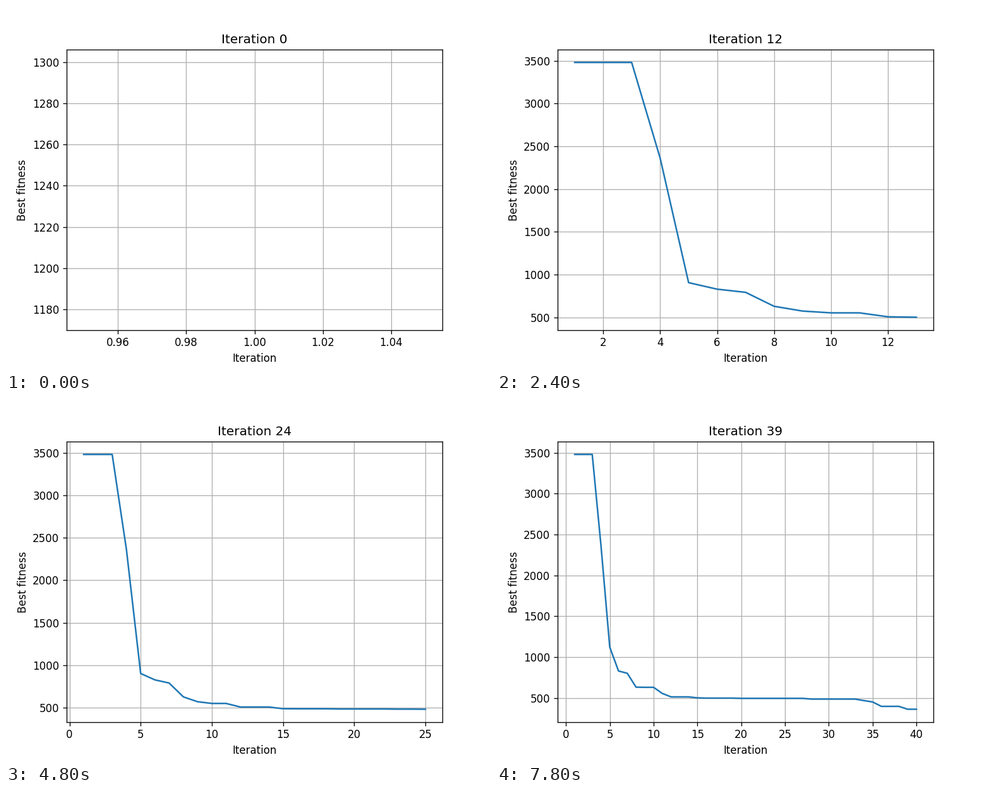
A matplotlib script for the animation above (8000 ms loop, 768 by 576 pixels).

```python
import matplotlib.pyplot as plt
from matplotlib.animation import FuncAnimation

FRAMES = 40
HEAD = [3480] * 3 + [2362]

# Fitness history of whichever candidate leads, keyed by the iteration count
# at which it takes the lead.
LATE = (HEAD + [1121, 829, 801, 631, 629, 629, 554] + [512] * 3 + [500]
        + [497] * 4)
HISTORIES = {
    1: [1238] * 4,
    5: HEAD[:3] + [2370, 833, 833, 633, 633, 557],
    10: HEAD + [906, 830, 793, 630, 574, 553, 553, 507, 502] + [490] * 5,
    19: (HEAD + [904, 829, 792, 629, 572, 552, 552] + [510] * 3 + [490]
         + [489] * 3 + [487] * 4 + [485] * 2 + [484] + [483] * 8),
    34: LATE + [489] * 3 + [487] * 11 + [469, 452],
    36: LATE + [494] * 8 + [485] * 6 + [467, 450] + [396] * 3 + [361] * 2,
}


def history(n):
    lead = max(start for start in HISTORIES if start <= n)
    return HISTORIES[lead][:n]


fig, ax = plt.subplots(figsize=(6.4, 4.8), dpi=120)


def draw(i):
    n = i + 1
    ax.clear()
    ax.plot(range(1, n + 1), history(n))
    ax.set_title(f"Iteration {i}")
    ax.set_xlabel("Iteration")
    ax.set_ylabel("Best fitness")
    ax.grid(True)


anim = FuncAnimation(fig, draw, frames=FRAMES, interval=200,
                     init_func=lambda: draw(0), repeat=True, repeat_delay=0)
plt.show()
```
